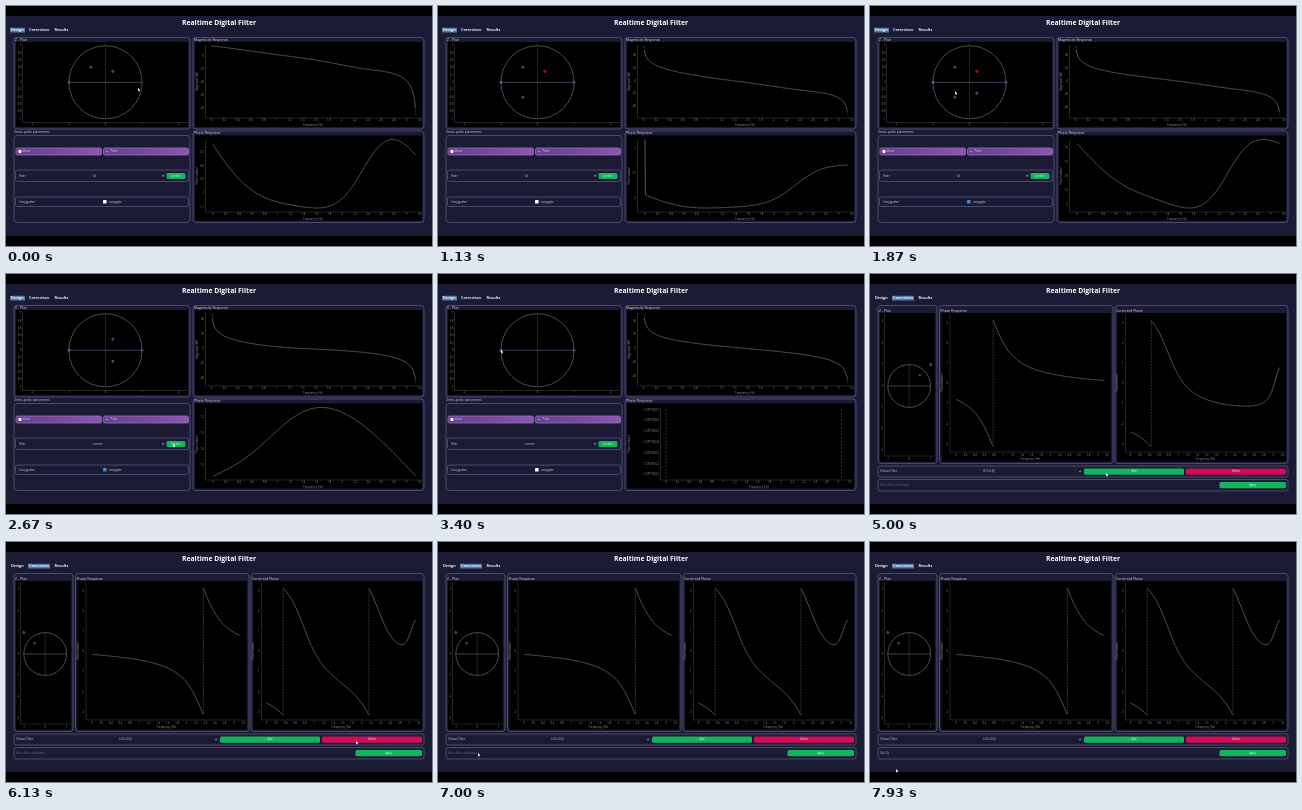
An HTML page with a canvas for the animation above (8000 ms loop, 426 by 240 pixels).

```html
<!DOCTYPE html>
<html lang="en">
<head>
<meta charset="utf-8">
<title>Realtime Digital Filter</title>
<style>
  html, body { margin: 0; width: 100%; height: 100%; overflow: hidden; background: #000; }
  canvas { display: block; width: 100vw; height: 100vh; }
</style>
</head>
<body>
<canvas id="stage"></canvas>
<script>
const W = 426, H = 240, LOOP = 8000, FPS = 15;
const canvas = document.getElementById('stage');
const ctx = canvas.getContext('2d');
const FONT = '"Open Sans", sans-serif';
const C = {
  page: '#1b1b36', border: '#56587a', plot: '#000', curve: '#7e7d74', circle: '#6c6c74',
  cross: '#45455f', axis: '#3c3c42', tick: '#94949a', text: '#d0d0da', mark: '#7c7cd0',
  red: '#d84444', green: '#12b45c', pink: '#d00c58'
};

// ---------- drawing helpers ----------
function box(x0, y0, x1, y1, fill, stroke, r = 2) {
  ctx.beginPath();
  ctx.roundRect(x0, y0, x1 - x0, y1 - y0, r);
  if (fill) { ctx.fillStyle = fill; ctx.fill(); }
  if (stroke) { ctx.strokeStyle = stroke; ctx.lineWidth = 0.8; ctx.stroke(); }
}
function line(x0, y0, x1, y1, color, width = 0.6, dash = []) {
  ctx.strokeStyle = color;
  ctx.lineWidth = width;
  ctx.setLineDash(dash);
  ctx.beginPath();
  ctx.moveTo(x0, y0);
  ctx.lineTo(x1, y1);
  ctx.stroke();
  ctx.setLineDash([]);
}
function text(s, x, y, size, color = C.text, align = 'left', weight = 400) {
  ctx.font = `${weight} ${size}px ${FONT}`;
  ctx.textAlign = align;
  ctx.textBaseline = 'middle';
  ctx.fillStyle = color;
  ctx.fillText(s, x, y);
}
function sideText(s, x, y) {
  ctx.save();
  ctx.translate(x, y);
  ctx.rotate(-Math.PI / 2);
  text(s, 0, 0, 2.6, C.tick, 'center');
  ctx.restore();
}
function dot(x, y, r, color) {
  ctx.fillStyle = color;
  ctx.beginPath();
  ctx.arc(x, y, r, 0, 2 * Math.PI);
  ctx.fill();
}
function panel(x0, y0, x1, y1, title, headHeight) {
  box(x0, y0, x1, y1, null, C.border, 3);
  ctx.fillStyle = C.plot;
  ctx.fillRect(x0 + 2, y0 + headHeight, x1 - x0 - 4, y1 - y0 - headHeight - 2);
  text(title, x0 + 1, y0 + headHeight - 2.2, 3.5, '#dcdce4');
}
function button(label, x0, y0, x1, y1, color) {
  box(x0, y0, x1, y1, color, null, 1.5);
  text(label, (x0 + x1) / 2, (y0 + y1) / 2, 2.7, '#e8f4ee', 'center');
}
function arrowDown(x, y) {
  ctx.fillStyle = '#aaaabc';
  ctx.beginPath();
  ctx.moveTo(x - 1.2, y - 0.7);
  ctx.lineTo(x + 1.2, y - 0.7);
  ctx.lineTo(x, y + 0.9);
  ctx.fill();
}

// ---------- filter mathematics; roots are [re, im] ----------
function response(w, zeros, poles) {
  const c = Math.cos(w), s = Math.sin(w);
  let mag = 1, phase = 0;
  const apply = (roots, sign) => roots.forEach(([x, y]) => {
    const re = 1 - x * c - y * s, im = x * s - y * c;
    mag *= Math.hypot(re, im) ** sign;
    phase += sign * Math.atan2(im, re);
  });
  apply(zeros, 1);
  apply(poles, -1);
  return { db: 20 * Math.log10(mag), phase: Math.atan2(Math.sin(phase), Math.cos(phase)) };
}
function sample(key, zeros, poles, n = 512) {
  return Array.from({ length: n }, (_, i) => response(Math.PI * (i + 0.01) / n, zeros, poles)[key]);
}
function reflect([x, y]) {
  const m = x * x + y * y;
  return [x / m, y / m];
}

// ---------- plots ----------
function axes(x0, y0, x1, y1, sideLabel) {
  line(x0, y0, x0, y1, C.axis);
  line(x0, y1, x1, y1, C.axis);
  sideText(sideLabel, x0 - 8, (y0 + y1) / 2);
}
function frequencyTicks(xa, xb, y, titleX) {
  for (let i = 0; i <= 16; i++) {
    const x = xa + (xb - xa) * i * 0.2 / Math.PI;
    text(+(i * 0.2).toFixed(1), x, y, 2.6, C.tick, 'center');
  }
  text('Frequency (Hz)', titleX, y + 4.3, 2.8, C.tick, 'center');
}
function valueTicks(lo, hi, toY, x) {
  const raw = (hi - lo) / 6, base = 10 ** Math.floor(Math.log10(raw));
  const step = base * [1, 2, 5, 10].find(m => m * base >= raw);
  for (let v = Math.ceil(lo / step) * step; v <= hi; v += step)
    text(+v.toFixed(2), x, toY(v), 2.6, C.tick, 'right');
}
function curve(values, xa, xb, toY) {
  ctx.strokeStyle = C.curve;
  ctx.lineWidth = 0.7;
  ctx.beginPath();
  values.forEach((v, i) => {
    const x = xa + (xb - xa) * i / values.length, y = toY(v);
    const wrapped = i && Math.abs(v - values[i - 1]) > 4;
    if (wrapped) {
      ctx.stroke();
      line(x, toY(values[i - 1]), x, y, '#55554e', 0.6, [2, 1]);
      ctx.strokeStyle = C.curve;
      ctx.lineWidth = 0.7;
      ctx.beginPath();
    }
    i && !wrapped ? ctx.lineTo(x, y) : ctx.moveTo(x, y);
  });
  ctx.stroke();
}
function fittedPlot(values, xa, xb, top, bottom, tickX) {
  const lo = Math.min(...values), hi = Math.max(...values);
  const toY = v => bottom - (bottom - top) * (v - lo) / (hi - lo);
  valueTicks(lo, hi, toY, tickX);
  curve(values, xa, xb, toY);
}
function unitCircle(cx, cy, r) {
  line(cx - r, cy, cx + r, cy, '#5c5c7c', 0.7);
  line(cx, cy - r, cx, cy + r, C.cross, 0.5);
  ctx.strokeStyle = C.circle;
  ctx.lineWidth = 0.7;
  ctx.beginPath();
  ctx.arc(cx, cy, r, 0, 2 * Math.PI);
  ctx.stroke();
}
function marker(x, y, isPole, color) {
  if (isPole) {
    line(x - 1, y - 1, x + 1, y + 1, color, 0.8);
    line(x - 1, y + 1, x + 1, y - 1, color, 0.8);
    return;
  }
  ctx.strokeStyle = color;
  ctx.lineWidth = 0.8;
  ctx.beginPath();
  ctx.arc(x, y, 1, 0, 2 * Math.PI);
  ctx.stroke();
}

// ---------- timeline ----------
const ONE = [1, 0], MINUS_ONE = [-1, 0];
const LEFT = [-0.4, 0.41], LEFT_CONJ = [-0.4, -0.41];
const INNER = [0.2, 0.3], INNER_CONJ = [0.2, -0.3];
const NEAR_PI = [-0.992, 0.091], SETTLED = [-0.883, 0.0945];

const designStates = [
  { at: 0, zeros: [MINUS_ONE, LEFT, INNER], poles: [], selected: MINUS_ONE },
  { at: 390, zeros: [MINUS_ONE, LEFT, INNER], poles: [ONE], selected: ONE, spike: true },
  { at: 730, zeros: [MINUS_ONE, LEFT, LEFT_CONJ, INNER], poles: [ONE], selected: LEFT, spike: true },
  { at: 930, zeros: [MINUS_ONE, LEFT, LEFT_CONJ, INNER], poles: [ONE], selected: INNER, spike: true },
  { at: 1260, zeros: [MINUS_ONE, LEFT, LEFT_CONJ, INNER, INNER_CONJ], poles: [ONE], selected: INNER },
  { at: 1990, zeros: [MINUS_ONE, INNER, INNER_CONJ], poles: [ONE] },
  { at: 2790, zeros: [MINUS_ONE], poles: [ONE], flat: true },
  { at: 3930, zeros: [NEAR_PI], poles: [ONE], flat: true },
  { at: 4260, zeros: [SETTLED], poles: [ONE] }
];
const CORRECTION_AT = 4530, FIRST_ADDED = 4860, SECOND_CHOSEN = 5600, SECOND_ADDED = 5860;
const allpass = [
  { pole: [0.5, 0.5], label: '(0.5+0.5j)' },
  { pole: [-0.5, 0.5], label: '(-0.5+0.5j)' }
];
const cursorPath = [
  [0, 132, 82], [330, 136, 77], [530, 85, 61], [730, 98, 195], [930, 107, 66],
  [1100, 98, 193.5], [1330, 98, 193.5], [1650, 85, 61], [1950, 85, 91], [2300, 92, 171],
  [2600, 167, 170], [2900, 167, 170], [3300, 63, 76], [3900, 63, 76], [4130, 61.5, 72.5],
  [4300, 67, 73], [4500, 33, 25], [4650, 33, 25], [4860, 236, 199], [5100, 236, 199],
  [5400, 210, 198], [5600, 130, 204], [5860, 250, 199], [6130, 350, 199],
  [6600, 350, 199], [7000, 40, 211], [7550, 40, 211], [7930, 26, 227]
];
const typed = { text: '0.4+.5j', from: 7070, step: 70 };

function cursorAt(t) {
  const i = cursorPath.findIndex(p => p[0] > t);
  if (i < 0) return cursorPath.at(-1).slice(1);
  const [t0, x0, y0] = cursorPath[i - 1], [t1, x1, y1] = cursorPath[i];
  const u = (t - t0) / (t1 - t0), e = u * u * (3 - 2 * u);
  return [x0 + (x1 - x0) * e, y0 + (y1 - y0) * e];
}
function drawCursor([x, y]) {
  ctx.fillStyle = '#fff';
  ctx.beginPath();
  [[0, 0], [0, 3.2], [0.8, 2.5], [1.4, 3.6], [1.9, 3.3], [1.4, 2.3], [2.3, 2.3]]
    .forEach(([dx, dy]) => ctx.lineTo(x + dx, y + dy));
  ctx.fill();
}

// ---------- pages ----------
function header(active) {
  text('Realtime Digital Filter', 213, 17, 6.8, '#fff', 'center', 700);
  [['Design', 5], ['Correction', 23], ['Results', 48.5]].forEach(([label, x], i) => {
    if (i === active) box(x - 1, 21.8, x + [14, 21][i], 26.6, '#5379a6', null, 0.5);
    text(label, x, 24.4, 3.8, '#f4f4f8', 'left', 700);
  });
}

const DESIGN_HEAD = 4.4, CORRECTION_HEAD = 7.5;

function designPlane(state) {
  const cx = 99.5, cy = 76.3, r = 36.6;
  panel(8, 31.5, 184, 123, 'Z - Plan', DESIGN_HEAD);
  line(16.5, 38, 16.5, 116.5, C.axis);
  line(16.5, 116.5, 182, 116.5, C.axis);
  for (let i = -5; i <= 5; i++) text(+(-i * 0.2).toFixed(1), 15.5, cy + i * r / 5, 2.6, C.tick, 'right');
  for (let i = -2; i <= 2; i++) text(i, cx + i * r, 118.7, 2.6, C.tick, 'center');
  unitCircle(cx, cy, r);
  const mark = isPole => p =>
    marker(cx + p[0] * r, cy - p[1] * r, isPole, p === state.selected ? C.red : C.mark);
  state.zeros.forEach(mark(false));
  state.poles.forEach(mark(true));
}

function designControls(t) {
  text('Zeros-poles placement:', 8, 126.5, 3.3);
  box(8, 129.5, 184, 216.5, null, C.border, 3);
  [['Zeros', 10, 95.5], ['Poles', 97.5, 182.5]].forEach(([label, x0, x1], i) => {
    const g = ctx.createLinearGradient(x0, 0, x1, 0);
    g.addColorStop(0, '#643f90');
    g.addColorStop(1, '#8c54b0');
    box(x0, 142, x1, 149, g, '#9274ae', 1.5);
    dot(x0 + (i ? 3.3 : 4), 145.5, i ? 1 : 1.7, i ? '#7cb0e8' : '#fff');
    text(label, x0 + 7, 145.5, 2.8, '#ddd4e8');
  });
  box(9.5, 164, 182.5, 175.5, null, C.border);
  text('Filter', 13, 170, 2.8);
  text(t < 2300 ? 'all' : 'current', 87, 170, 2.8);
  arrowDown(157, 170);
  button('Confirm', 160.5, 167, 179.5, 173, C.green);
  box(9.5, 191, 182.5, 200.5, null, C.border);
  text('Conjugation', 13, 196, 2.8);
  const checked = t >= 1260 && t < 2790;
  box(97, 194, 100.6, 197.6, checked ? '#3d86d8' : '#fff', null, 0.6);
  text('conjugate', 103, 196, 2.8);
}

function designPage(t) {
  const state = designStates.findLast(s => s.at <= t);
  const { zeros, poles } = state;
  header(0);
  designPlane(state);
  designControls(t);

  panel(187, 31.5, 418, 123, 'Magnitude Response', DESIGN_HEAD);
  axes(199.5, 39, 415, 112, 'Magnitude (dB)');
  frequencyTicks(205.5, 410, 114.7, 307);
  const db = sample('db', zeros, poles);
  if (poles.length) db[0] = db[1];
  fittedPlot(db, 205.5, 410, 40, 109, 198);

  panel(187, 125, 418, 216.5, 'Phase Response', DESIGN_HEAD);
  if (state.flat) {
    axes(222.5, 134, 415, 206, '');
    sideText('Phase (radian)', 191.5, 170);
    frequencyTicks(228, 408.5, 208.7, 321);
    for (let i = 0; i < 7; i++) text('-1.5707963' + (27 - i), 221, 136 + i * 10.8, 2.6, C.tick, 'right');
    for (const x of [228, 403.5]) line(x, 135, x, 205, '#4c4c40', 0.7, [2, 1.5]);
    return;
  }
  axes(199.5, 134, 415, 206, 'Phase (radian)');
  frequencyTicks(207, 410, 208.7, 307);
  const phase = sample('phase', zeros, poles);
  if (poles.length) phase[0] = phase[1] + (state.spike ? 1.13 : 0);
  fittedPlot(phase, 207, 410, 133.5, 202, 198);
}

function phasePanel(x0, x1, title, xa, xb, zeros, poles) {
  const axisX = x0 + 10.5, toY = v => 109.5 - 20.2 * v;
  panel(x0, 31.5, x1, 189.5, title, CORRECTION_HEAD);
  axes(axisX, 40, x1 - 3, 178, 'Phase (radian)');
  for (let v = -3; v <= 3; v++) text(v, axisX - 2, toY(v), 2.6, C.tick, 'right');
  frequencyTicks(xa, xb, 181, (xa + xb) / 2);
  const values = sample('phase', zeros, poles);
  values[0] = values[1];
  curve(values, xa, xb, toY);
}

function correctionPage(t) {
  const chosen = allpass[t < SECOND_CHOSEN ? 0 : 1];
  const added = allpass.slice(0, t < FIRST_ADDED ? 0 : t < SECOND_ADDED ? 1 : 2).map(f => f.pole);
  const zero = reflect(chosen.pole);
  header(1);

  const cx = 39.2, cy = 112, r = 21.4;
  panel(8, 31.5, 67, 189.5, 'Z - Plan', CORRECTION_HEAD);
  line(14.5, 40, 14.5, 182, C.axis);
  line(14.5, 182, 65, 182, C.axis);
  for (let i = -3; i <= 3; i++) text(-i, 13.3, cy + i * r, 2.6, C.tick, 'right');
  for (let i = -1; i <= 1; i++) text(i, cx + i * r, 185, 2.6, C.tick, 'center');
  unitCircle(cx, cy, r);
  marker(cx + zero[0] * r, cy - zero[1] * r, false, C.mark);
  marker(cx + chosen.pole[0] * r, cy - chosen.pole[1] * r, true, C.mark);

  phasePanel(69.5, 243, 'Phase Response', 86, 234.5, [zero], [chosen.pole]);
  phasePanel(245, 418, 'Corrected Phase', 260.5, 410,
    [SETTLED, ...added.map(reflect)], [ONE, ...added]);

  box(8, 192, 418, 203, null, C.border);
  text('Choose Filter', 10, 197.7, 2.8);
  text(chosen.label, 113, 197.7, 2.8);
  arrowDown(210, 197.7);
  button('Add', 214, 194.5, 314, 200.7, C.green);
  button('Delete', 316, 194.5, 416, 200.7, C.pink);

  box(8, 205.5, 418, 217, null, C.border);
  const count = Math.max(0, Math.floor((t - typed.from) / typed.step));
  if (count) text(typed.text.slice(0, count), 10, 211.2, 2.8);
  else text('Enter filter coefficients', 10, 211.2, 2.8, '#66667c');
  button('Apply', 349.5, 208, 416, 214.3, C.green);
}

// ---------- playback ----------
function render(t) {
  const scale = window.devicePixelRatio || 1;
  const w = Math.round(innerWidth * scale), h = Math.round(innerHeight * scale);
  if (canvas.width !== w || canvas.height !== h) { canvas.width = w; canvas.height = h; }
  ctx.setTransform(w / W, 0, 0, h / H, 0, 0);
  ctx.fillStyle = '#000';
  ctx.fillRect(0, 0, W, H);
  ctx.fillStyle = C.page;
  ctx.fillRect(0, 10, W, 220);
  (t < CORRECTION_AT ? designPage : correctionPage)(t);
  drawCursor(cursorAt(t));
}
const start = performance.now();
function tick() {
  const elapsed = (performance.now() - start) % LOOP;
  // The small bias lets times rounded down to 10 ms land on their own step.
  render(Math.floor(elapsed * FPS / 1000 + 0.1) * 1000 / FPS);
  requestAnimationFrame(tick);
}
tick();
</script>
</body>
</html>
```
